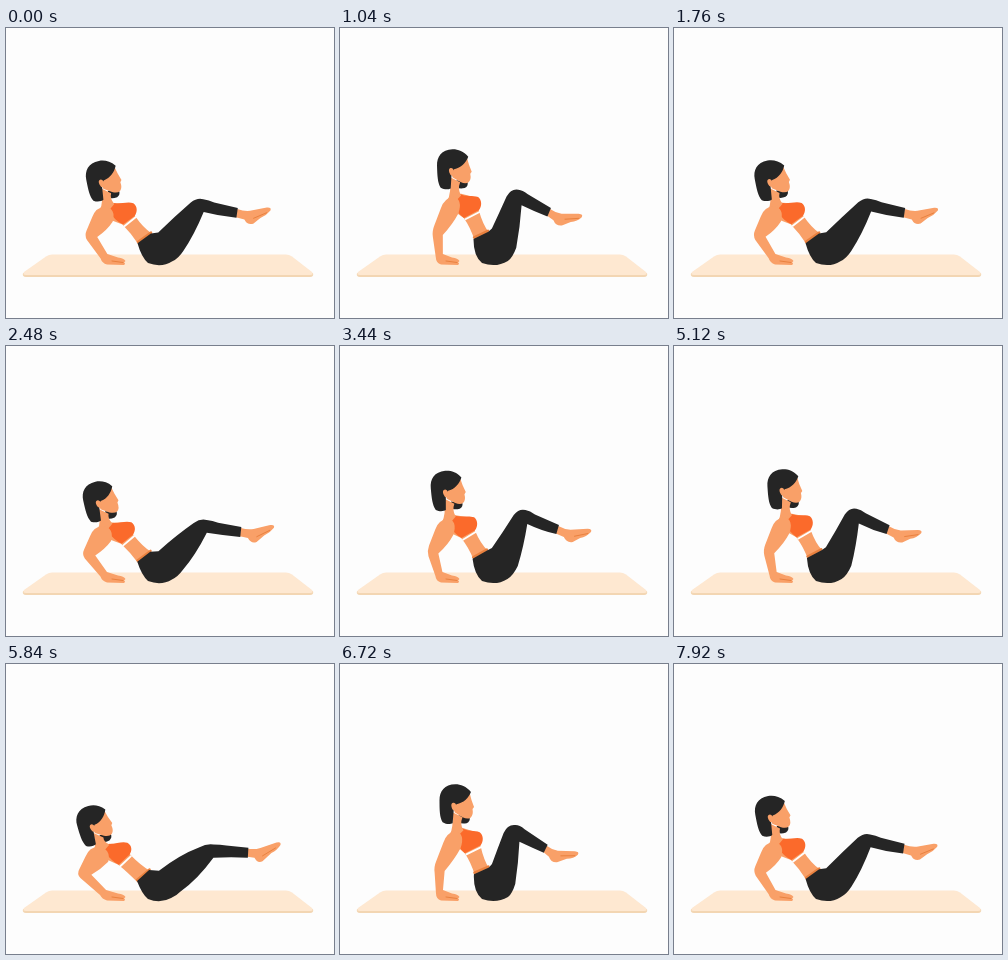
An HTML page for the animation above (8 s loop, 328 px wide and 290 px high).

```html
<!DOCTYPE html>
<html lang="en">
<head>
<meta charset="utf-8">
<title>Seated knee tucks</title>
<style>
  html, body { margin: 0; width: 100%; height: 100%; overflow: hidden; background: #fdfdfd; }
  svg { display: block; width: 100vw; height: 100vh; }
  .skin { fill: #f9a068; }
  .shade { fill: none; stroke: #e9813f; stroke-width: 1; stroke-linecap: round; }
  .top { fill: #fb6a2b; }
  .dark { fill: #252525; }
  .hem { fill: none; stroke: #fff; stroke-width: 1.8; }
  .waist { stroke-width: 2.4; }
</style>
</head>
<body>
<svg viewBox="0 0 328 290">
  <path fill="#f3d6b3" d="M17 245 L307 245 Q308 249 304 249 L20 249 Q16 249 17 245Z"/>
  <path fill="#fee8d1" d="M46 226.5 L280 226.5 Q283 226.5 286 228.500 L306 244 Q308 247 304 247 L20 247 Q16 247 18 244 L40 228.500 Q43 226.500 46 226.500Z"/>
  <path id="foot" class="skin"/>
  <path id="sole" class="shade"/>
  <path id="torso" class="skin"/>
  <path id="waist" class="shade waist"/>
  <path id="pants" class="dark"/>
  <path id="bra" class="top"/>
  <path id="hem" class="hem"/>
  <g class="head"><path class="dark" d="M2 13 L13 15 Q14 19 10 21 Q5 22 2 20Z"/></g>
  <path id="neck" class="skin"/>
  <path id="arm" class="skin"/>
  <path id="fingers" class="shade"/>
  <g class="head">
    <path class="skin" d="M13 -10 L15 -2 L17.500 5 L16 7 Q17 13 14 15.500 Q11 17.500 6 15 L-2 10 L-3 0Z"/>
    <path class="dark" d="M14.500 -10 C10 -16 4 -18 -1 -18 C-12 -18 -17 -11 -17 -2 C-17 8 -17 15 -14 20 C-10 22.500 -6 22 -4 21 L-3 10 C-3 7 -2 4 0 2 C7 1 12 -4 14.500 -10Z"/>
    <ellipse class="skin" cx="-2.500" cy="4.500" rx="2.500" ry="4" transform="rotate(-15 -2.500 4.500)"/>
  </g>
</svg>
<script>
// Each part: tucked, middle and extended pose with the same path commands.
const parts = {
  '.head': [
    'translate(117 138) rotate(0)',
    'translate(103 146) rotate(-8)',
    'translate(87.5 159.5) rotate(-16)'
  ],
  '#neck': [
    'M113 148 L123 153 Q120 160 124 166 L118 172 L110 171 Q114 164 113 148Z',
    'M100 156 L110 161 Q108 167 112 173 L107 179 L98 179 Q102 172 100 156Z',
    'M86 169 L97 174 Q97 178 103 181 L97 188 L87 186 Q91 182 86 169Z'
  ],
  '#torso': [
    'M115 167 L124 164 L140 169 L141 182 Q144 196 149 204 L135 211 Q131 198 125 189 L117 182Z',
    'M103 176 L112 172 L131 174 L132 186 Q139 199 147 205 L133 215 Q127 203 119 194 L109 190Z',
    'M91 184 L103 180 L122 180 L124 191 Q135 202 144 207 L132 219 Q121 208 112 201 L101 196Z'
  ],
  '#bra': [
    'M114 168 L122 163.500 C128 168 135 166 140 168 C144 171 144 177 141 181 L125 189 C120 185 118 180 117 176Z',
    'M102 177 L111 172 C117 174 125 171 131 173 C135 176 135 182 132 186 L119.500 194 C114 191 110 187 108 183Z',
    'M91 184 L101 180 C109 181 115 177 121 179 C126 182 126 187 123 191 L112.500 201 C107 198 104 195 100 190Z'
  ],
  '#hem': ['M126 190.500 L142.500 182.500', 'M120.500 196 L133.500 187', 'M113.500 203 L125 192'],
  '#waist': ['M134.500 208.500 L148.500 202.500', 'M132.500 212.500 L146 204', 'M131 216 L143.500 205.500'],
  '#pants': [
    'M134 210 L149 203.500 L152 200 Q157 185 163 169 Q167 160 175 161 Q179 161 184 165 L207 181 L203 189 Q192 184 179 178 Q178 200 175 220 Q172 230 168 233 Q156 240 142 235 Q133 228 134 210Z',
    'M132 214 L146 205 L152 203 Q166 187 179 171 Q185 165 191 167 Q196 168 201 171 L225 179 L223 188.500 Q207 186 192 180 Q186 203 178 221 Q173 230 167 233 Q156 240 142 235 Q135 229 132 214Z',
    'M131 217 L143 206 L153 207 Q174 191 194 184 Q201 180 208 181 Q215 181 221 182 L243 184 L242.500 194 Q225 193 208 194.500 Q191 217 174 228 Q170 232 165 234 Q154 240 142 235 Q136 230 131 217Z'
  ],
  '#foot': [
    'M206 182 Q211 186 217 187 L234 187.500 Q239 188 237 191 Q233 195 226 195 L216 198.500 Q210 199 208 193 L202.500 188Z',
    'M224.500 180 Q231 183 237 183 L254 181 Q259 181 257.500 184 Q253 189 247 191 L240 195.500 Q234 197 231 191 L222.500 188Z',
    'M242.500 185 Q249 186 255 184 L271 178.500 Q276 177 275 181 Q272 186 266 189 L257 197.500 Q252 200 249 194 L242 193Z'
  ],
  '#sole': ['M220 192 L234 192', 'M241 190 L254 186', 'M257 192 L270 184'],
  '#arm': [
    'M116 166 Q107 169 104 178 L97 196 Q94 203 95 209 L96 229 Q96 235 101 236.500 L118 237 Q120 235.500 118 234.500 L119.500 233 Q118 230 112 229.500 L103 226 L105 207 Q115 195 121 184 Q126 170 116 166Z',
    'M104 175 Q94 177 91 186 L85 201 Q83 206 85 211 L95 230 Q96 235 101 236.500 L118 237 Q120 235.500 118 234.500 L119.500 233 Q118 230 112 229.500 L102 226 L95 208 Q105 200 110 191 Q114 178 104 175Z',
    'M92 183 Q83 183 79 193 L73 205 Q70 210 74 214 L94 231 Q96 235 101 236.500 L118 237 Q120 235.500 118 234.500 L119.500 233 Q118 230 112 229.500 L100 226 L85 211 Q95 205 102 198 Q105 185 92 183Z'
  ],
  '#fingers': ['M106 233 L117 234.500', 'M106 233 L117 234.500', 'M106 233 L117 234.500']
};

const LOOP = 8000, STEP = 80;
// Moments when the body passes the middle pose, alternately opening and closing.
const passes = [-95, 830, 1670, 2640, 3520, 4400, 5245, 6225, 7035, 8000];

const number = /-?\d+(?:\.\d+)?/g;
const tracks = Object.entries(parts).map(([name, poses]) => ({
  nodes: document.querySelectorAll(name),
  attr: name === '.head' ? 'transform' : 'd',
  shape: poses[0],
  values: poses.map(p => p.match(number).map(Number))
}));

// -1 is tucked, 1 is extended.
function reach(t) {
  let i = 0;
  while (i < passes.length - 2 && t >= passes[i + 1]) i++;
  const x = Math.PI * (t - passes[i]) / (passes[i + 1] - passes[i]);
  const swing = (Math.sin(x) + 0.05 * Math.sin(3 * x)) / 0.95;
  return i % 2 ? -swing : swing;
}

function blend({ shape, values: [a, b, c] }, v) {
  let i = 0;
  return shape.replace(number, () => {
    const n = b[i] + v * (c[i] - a[i]) / 2 + v * v * ((a[i] + c[i]) / 2 - b[i]);
    i++;
    return n.toFixed(2);
  });
}

function draw(t) {
  const v = reach(t);
  for (const track of tracks) {
    const value = blend(track, v);
    track.nodes.forEach(n => n.setAttribute(track.attr, value));
  }
}

const start = performance.now();
function tick() {
  const t = (performance.now() - start) % LOOP;
  draw(Math.floor(t / STEP) * STEP);
  requestAnimationFrame(tick);
}
draw(0);
requestAnimationFrame(tick);
</script>
</body>
</html>
```
